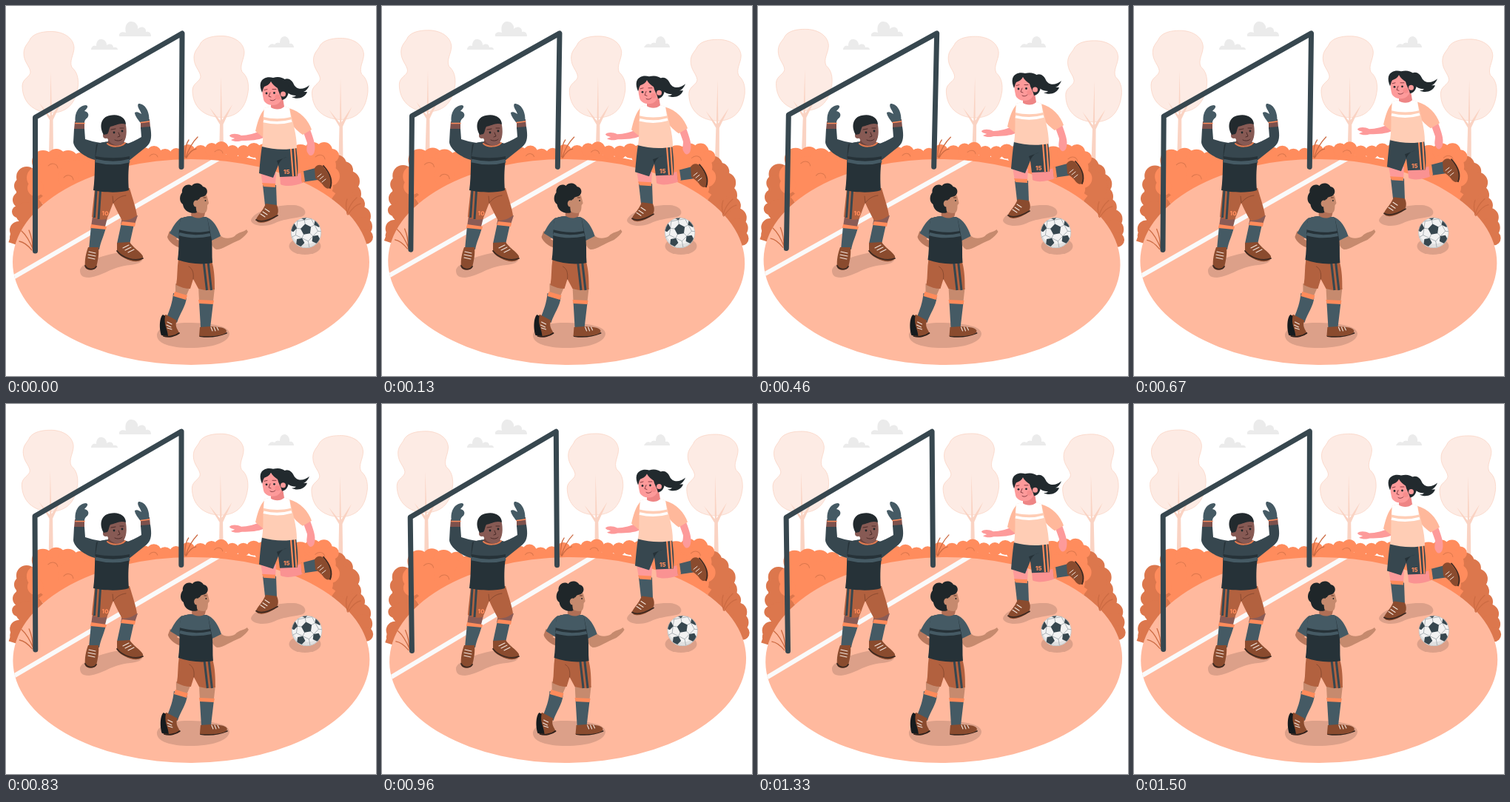
Recreate the animation shown at these times as an HTML page. Size 500x500 px, loop 1.54 s.

```html
<!DOCTYPE html>
<html lang="en">
<head>
<meta charset="utf-8">
<title>Football match</title>
<style>
html,body{margin:0;width:100%;height:100%;overflow:hidden;background:#fff}
svg{display:block;width:100vw;height:100vh}
text{font:800 8px Inter,sans-serif;fill:#ff8b5b}
.line{fill:none;stroke-linecap:round;stroke-linejoin:round}
.flat{fill:none}
</style>
</head>
<body>
<svg viewBox="0 0 500 500">
<defs>
  <g id="tree">
    <path d="M290 40.500C306 40 321 48 322 62C322 72 315 80 319 89C326 95 328 103 327.500 113C325 135 315 150 291 150.500C266 150 252 135 252 114C252 104 263 102 263 95C262 87 254 82 254 70C254 60 260 57 263 50C268 43 279 40.500 290 40.500Z" fill="#fdebe4" stroke="#fad0bf" stroke-width=".7"/>
    <path d="M290.500 95L292 154L306 133L293.500 160L294 206H288L289 160L275 137L289.500 155Z" fill="#fad3c3"/>
  </g>
  <clipPath id="field"><ellipse cx="250" cy="346" rx="241" ry="139"/></clipPath>
  <clipPath id="disc"><circle cx="405.500" cy="306.500" r="20.500"/></clipPath>
</defs>

<g fill="#ebebeb">
  <path d="M153 41C152 36 157 34 162 36C160 28 163 21 169 21C175 21 179 26 178 31C183 26 190 29 189 35C193 34 196 36 196 41Z"/>
  <path d="M115 59C115 55 118 53 122 54C122 47 126 44 130 45C134 46 136 49 136 53C141 50 145 52 145 56C149 55 151 57 151 59Z"/>
  <path d="M354 56C356 52 359 50 363 52C365 49 368 49 370 50C370 44 373 41 377 41C381 42 384 46 383 51C387 50 389 53 389 56Z"/>
</g>

<g id="scene">
  <use href="#tree" x="-230" y="-6"/>
  <use href="#tree"/>
  <use href="#tree" x="161.500" y="3"/>
  <g id="bush"></g>
  <ellipse cx="250" cy="346" rx="241" ry="139" fill="#ffb99e"/>
  <path d="M0 369L279 207H292L0 376Z" fill="#fafafa" clip-path="url(#field)"/>
  <g class="line" stroke="#cc6b43" stroke-width="1.300">
    <path d="M243 205C246 195 250 186 259 177M242 204C242 194 243 186 247 181M244 205C248 197 252 194 257 193"/>
    <path d="M37 330C33 320 28 310 21 304M36 328C36 318 34 310 31 303M35 330C30 324 25 319 18 318"/>
    <path d="M461 281C463 272 467 265 474 259M462 282C468 273 473 268 479 267M461 280C459 272 459 266 461 261"/>
  </g>
  <path class="line" d="M39.500 331V150.500L238 37L237 217.500" stroke="#37474f" stroke-width="7"/>
</g>

<g fill="#dca089">
  <path d="M100 357C101 345 150 329 174 332C189 336 190 348 168 350C142 352 132 365 112 367C102 367 100 363 100 357Z"/>
  <path d="M331 290C332 279 363 268 389 269C406 270 409 283 398 285C384 288 374 288 362 294C351 299 333 298 331 290Z"/>
  <ellipse cx="404" cy="324.500" rx="21.500" ry="11.500"/>
  <path d="M204 446C203 434 224 427 251 428C281 429 302 433 302 443C301 455 278 462 249 462C222 462 205 456 204 446Z"/>
</g>

<g id="keeper">
  <path d="M117 284L137 286L134 298H115ZM157 285L178 283L174 295L155 296Z" fill="#8a5b55"/>
  <path d="M115 297L135 299C133 309 128 318 126 329H112ZM156 293L173 295L167 322L150 321Z" fill="#455a64"/>
  <path d="M115 295L136 298L135 302L114 300ZM157 291L175 293L174 298L155 296Z" fill="#ff8b5b"/>
  <path d="M111 326L125 326C126 335 124 345 122 353C119 358 109 358 107 353C106 343 108 335 111 326ZM150 320L167 319C172 327 181 331 185 338C186 344 178 347 168 344C158 341 149 334 150 330Z" fill="#8a4b2e"/>
  <path class="line" d="M107 351C110 357 119 357 122 352M150 331C157 340 173 346 185 341" stroke="#3d2921" stroke-width="1.800"/>
  <path class="line" d="M112 332L121 334M111 336L121 338M111 340L120 342M158 327L166 323M161 330L169 326M165 333L173 329" stroke="#f3e4dc" stroke-width="1.100"/>
  <path d="M120 246L167 246C171 260 176 274 177 283C170 288 164 290 157 290C152 281 148 273 145 266C141 275 139 283 136 288C128 290 121 288 116 285C117 272 119 258 120 246Z" fill="#b2613f"/>
  <path d="M145 266C149 261 154 257 162 256M145 266L144 257" class="line" stroke="#8a4a30"/>
  <path class="flat" d="M122 249L119.500 286M127.500 250L125 288" stroke="#37474f" stroke-width="3"/>
  <text x="129.500" y="283" transform="rotate(3 134 280)">10</text>
  <path d="M93 156H106L106 167H92ZM182 154L194 153L195 164L182 166Z" fill="#7d514c"/>
  <path d="M92 166L106 166L107 180C114 182 120 184 128 185L120 208C108 205 92 194 91 184Z" fill="#37474f"/>
  <path d="M182 164L195 163C197 175 197 184 190 190L165 210L160 187C169 185 176 181 183 177Z" fill="#37474f"/>
  <path d="M122 187C130 182 158 182 167 187L167 209C165 221 165 236 166 249C154 253 131 252 118 249C121 228 119 207 122 187Z" fill="#263238"/>
  <path d="M124 186C137 182 157 182 167 187L167 203C154 206 136 206 121 203Z" fill="#37474f"/>
  <path class="flat" d="M121 209C137 213 153 213 167 209" stroke="#455a64" stroke-width="4.500"/>
  <path d="M139 179L159 181L160 188C154 191 143 190 137 186Z" fill="#70453f"/>
  <path d="M137 186C143 191 155 191 161 185" class="line" stroke="#e27b50" stroke-width="2"/>
  <path d="M137 159C145 153 160 153 162 161C164 173 162 184 155 188C147 190 140 185 137 179Z" fill="#875a54"/>
  <circle cx="135" cy="175" r="4" fill="#875a54"/>
  <path d="M132 174C125 162 129 150 140 148C151 145 162 150 162 160C154 157 148 162 141 163C139 166 139 171 137 173Z" fill="#222a2e"/>
  <g fill="#1d2427"><circle cx="146" cy="171" r="1.400"/><circle cx="157" cy="169" r="1.400"/></g>
  <path class="line" d="M142 167L148 166M154 165L159 165M152 171L154 176L151 177M147 181C151 183 155 182 157 180" stroke="#4b2c2a"/>
  <path d="M94 158C92 146 97 135 108 134C112 135 110 138 106 142C111 143 113 147 110 151C107 153 106 155 106 158ZM181 157C178 153 174 148 174 144C177 142 180 144 183 146C182 141 176 136 179 132C188 132 194 142 193.500 155L182 158Z" fill="#455a64"/>
  <path class="line" d="M94 158.500L106 158.500M182 157.500L193.500 156" stroke="#ff8b5b" stroke-width="1.600"/>
</g>

<g id="girl">
  <g transform="translate(0 2)">
    <path d="M370 227L394 225L402 222L403 236C392 241 378 243 371 239Z" fill="#fa9292"/>
    <path d="M399 222L418 217L421 233L400 236Z" fill="#455a64"/>
    <path d="M398 222L402 221L404 235L400 237Z" fill="#ff8b5b"/>
    <path d="M417 217C420 212 427 211 430 217C437 225 441 234 439 242C437 246 433 245 430 242C426 236 421 233 418 231Z" fill="#8a4b2e"/>
    <path class="line" d="M429 214C437 223 442 234 438 244" stroke="#3d2921" stroke-width="1.800"/>
    <path class="line" d="M421 229L426 225M424 232L429 228M427 236L432 232" stroke="#f3e4dc"/>
    <path d="M344 222L365 224L364 240H347Z" fill="#fd9a9a"/>
    <path d="M347 240H365L366 268L350 267Z" fill="#455a64"/>
    <path d="M346 237L364 238V243L348 242Z" fill="#ff8b5b"/>
    <path d="M351 265L366 267C370 276 367 283 360 286C351 292 338 293 338 286C341 280 347 275 351 265Z" fill="#8a4b2e"/>
    <path class="line" d="M338 287C344 291 355 288 367 281" stroke="#3d2921" stroke-width="1.800"/>
    <path class="line" d="M350 272L356 276M347 276L353 280M344 279L350 283" stroke="#f3e4dc" stroke-width="1.100"/>
    <path d="M346 187L392 188C394 204 395 216 394 228L370 229L368 213L361 230L342 224C343 212 344 200 346 187Z" fill="#37474f"/>
    <path d="M368 213C370 207 374 203 380 202L366 207Z" fill="#263238"/>
    <path class="flat" d="M385 190L388 228M390 190L392.500 228" stroke="#ff8b5b" stroke-width="2.200"/>
    <text x="375" y="225.500">15</text>
  </g>
  <path d="M349 167C337 172 326 175 318 175C312 172 305 172 302 175C302 177 307 178 309 179L304 181C309 184 315 183 319 182C331 182 341 181 348 178Z" fill="#fd9a9a"/>
  <path d="M402 171L411 167C415 178 419 188 417 196C416 203 410 204 408 199C405 195 407 191 407 185Z" fill="#fd9a9a"/>
  <path d="M350 139C343 145 340 157 337 169L348 178L354 160ZM382 138C398 142 409 155 413 167L401 174C392 168 387 161 382 154Z" fill="#ffb89b"/>
  <path d="M349 138C360 134 374 134 383 138C387 155 393 174 393 192C378 195 360 194 346 190C349 171 346 155 349 138Z" fill="#ffcdb5"/>
  <path d="M349 138C359 134 375 134 383 138L385 150C373 153 360 153 348 150Z" fill="#fff"/>
  <path class="flat" d="M348 155.500C360 158.500 374 158.500 386 155" stroke="#fff" stroke-width="3.600"/>
  <path d="M358 128L374 124L376 136C371 141 362 140 358 137Z" fill="#ee8585"/>
  <path d="M373 102C379 95 386 99 389 106C393 114 403 113 410 107C408 112 405 115 402 116L407 116C404 124 394 127 386 123C389 123 391 122 392 121C384 121 379 117 377 111Z" fill="#222a2e"/>
  <path d="M347 106C354 100 368 102 373 109C377 117 374 129 366 133C358 136 349 132 348 126C346 118 346 112 347 106Z" fill="#fd9a9a"/>
  <path d="M344 104C346 97 354 95 361 97C372 94 381 99 382 109C383 118 380 126 373 127C372 122 368 116 367 111C364 109 360 106 358 102C356 106 352 108 349 109C347 112 347 115 346 117C344 112 343 108 344 104Z" fill="#222a2e"/>
  <circle cx="374.500" cy="119" r="3.500" fill="#fd9a9a"/>
  <circle cx="367" cy="123" r="3.500" fill="#f48686" opacity=".65"/>
  <g fill="#222a2e"><circle cx="352" cy="118" r="1.400"/><circle cx="362.500" cy="117.500" r="1.400"/></g>
  <path class="line" d="M349 113.500L353 112.500M360 112.500L365 112.500M357 117L355 122L358 123M357 127C360 129 363 127 364 126" stroke="#8b3f45"/>
</g>

<g id="ball"></g>

<g id="boy">
  <path d="M229 375L249 379L243 393L229 388ZM260 379L282 381L280 399H261Z" fill="#c68a6e"/>
  <path d="M226 388L244 394C243 406 235 415 231 428L217 421C221 411 225 401 226 388ZM261 400L280 401L276 435L263 434Z" fill="#455a64"/>
  <path d="M228 386L245 391L243 397L226 392ZM260 397L281 398L280 403L261 402Z" fill="#ff8b5b"/>
  <path d="M216 417L231 425C227 433 233 438 234 442C230 447 218 448 211 445C207 435 209 420 216 417Z" fill="#8a4b2e"/>
  <path d="M212 417C207 421 207 437 210 445L219 446C218 435 213 431 215 419Z" fill="#161b1e"/>
  <path class="line" d="M213 446C220 448 229 446 234 442M262 446C274 448 288 446 298 442" stroke="#2f211c" stroke-width="1.800"/>
  <path d="M262 434L276 433C284 434 296 433 298 439C298 445 283 447 261 446Z" fill="#8a4b2e"/>
  <path class="line" d="M218 427L224 430M217 431L223 434M218 435L224 437M277 434L279 439M281 434L283 439M285 434L287 438" stroke="#f3e4dc" stroke-width="1.100"/>
  <path d="M233 342L278 344C282 358 282 371 282 383C274 385 267 384 260 382L253 369L249 382C242 382 236 380 230 377C232 365 231 354 233 342Z" fill="#b2613f"/>
  <path class="line" d="M253 369C254 360 252 355 247 352" stroke="#8a4a30"/>
  <path class="flat" d="M267 345L271.500 384M273 345L277.500 384" stroke="#37474f" stroke-width="3"/>
  <path d="M221 304L234 311L230 315L236 318V327C228 325 219 318 218 312Z" fill="#b9795e"/>
  <path d="M277 314L289 309C293 315 303 315 309 311C314 305 321 306 325 302L327 305C325 309 321 312 316 316C303 321 291 330 284 329C278 326 277 320 277 314Z" fill="#c68a6e"/>
  <path d="M237 286C229 291 225 300 221 307L234 315L240 299ZM269 285C280 287 287 301 290 311L278 317L266 303Z" fill="#455a64"/>
  <path d="M236 287C247 283 261 283 272 286L278 316C279 327 278 337 279 347C264 350 246 348 232 343C235 324 232 304 236 287Z" fill="#263238"/>
  <path d="M236 287C247 283 261 283 272 286L275 304C262 307 246 306 233 302Z" fill="#455a64"/>
  <path class="flat" d="M234 308C247 312 263 312 276 309" stroke="#455a64" stroke-width="4"/>
  <path d="M252 273L270 275L268 284C262 288 254 287 250 283Z" fill="#b06f56"/>
  <path d="M254 255C262 250 271 252 272 258L274 266C274 268 272 268 272 270C272 276 271 280 266 280C259 280 254 276 252 270Z" fill="#c68a6e"/>
  <path d="M258 279C250 282 240 277 239 268C233 264 235 255 238 252C237 244 245 239 251 243C256 237 264 240 266 244C273 245 274 254 268 257C266 258 263 257 261 261C256 262 256 273 258 279Z" fill="#1f2629"/>
  <ellipse cx="257" cy="267" rx="3.800" ry="4.500" fill="#c68a6e"/>
  <circle cx="269.500" cy="263" r=".9" fill="#222"/>
  <path class="line" d="M267 259L270 259" stroke="#5f3326"/>
</g>
</svg>

<script>
const $ = id => document.getElementById(id);
const LOOP = 1540, DARK = '#dc774d', BRIGHT = '#ff8c5d';

// Each bush: colour, arc along the field's rim, then x, y, radius triples
const bushes = [
  [DARK, 'M12 322A241 139 0 0 1 50 268.4',
    28,231,14, 22,243,11, 20,262,11, 34,252,20, 16,278,8, 28,280,15, 17,303,12, 14,312,9],
  [DARK, 'M440 260.5A241 139 0 0 1 487 316',
    447,214,13, 457,222,12, 464,237,14, 466,254,14, 473,268,12, 480,284,13, 482,298,13, 486,312,10, 450,240,22],
  [BRIGHT, 'M50 268.4A241 139 0 0 1 440 260.5',
    50,210,15, 68,206,13, 84,209,14, 101,209,11, 113,217,13, 43,232,15, 66,234,28, 95,232,24, 118,230,20, 40,246,11, 140,214,12,
    165,212,14, 186,203,12, 200,199,10, 215,203,10, 230,201,9, 246,197,10, 263,198,10, 278,194,9, 291,193,10, 306,197,9, 321,197,9, 335,195,10,
    350,200,14, 370,206,18, 398,203,16, 415,196,12, 430,195,11, 441,202,9, 425,216,21, 405,225,20, 438,230,13, 428,244,14]
];
$('bush').innerHTML = bushes.map(([fill, arc, ...n]) => {
  let s = `<path d="${arc}" fill="none" stroke="${fill}" stroke-width="18"/>`;
  for (let i = 0; i < n.length; i += 3) s += `<circle cx="${n[i]}" cy="${n[i + 1]}" r="${n[i + 2]}"/>`;
  return `<g fill="${fill}">${s}</g>`;
}).join('') + `<path class="line" d="M57 216C62 211 69 213 70 219M78 232C82 227 90 228 91 235M194 203C198 198 204 200 205 204M282 197C286 193 292 194 293 199M418 204C423 199 430 201 431 207" stroke="${DARK}"/>`;

function pentagon(x, y, r, turn) {
  const pts = [];
  for (let i = 0; i < 5; i++) {
    const a = turn + i * Math.PI * 0.4;
    pts.push((x + r * Math.cos(a)).toFixed(1) + ',' + (y + r * Math.sin(a)).toFixed(1));
  }
  return `<polygon points="${pts.join(' ')}"/>`;
}

function drawBall() {
  const cx = 405.5, cy = 302, tilt = -1.75;
  let dark = pentagon(cx, cy, 7.5, tilt), seams = '';
  for (let i = 0; i < 5; i++) {
    const a = tilt + i * Math.PI * 0.4, b = a + Math.PI * 0.2;
    const at = (r, q) => `${(cx + r * Math.cos(q)).toFixed(1)} ${(cy + r * Math.sin(q)).toFixed(1)}`;
    seams += `M${at(7, a)}L${at(13, a)}L${at(16, b)}L${at(13, a + Math.PI * 0.4)}M${at(16, b)}L${at(26, b)}`;
    dark += pentagon(cx + 18.5 * Math.cos(a), cy + 19 * Math.sin(a), 6, a + Math.PI);
  }
  $('ball').innerHTML = `<g clip-path="url(#disc)"><circle cx="405.5" cy="306.5" r="20.5" fill="#f2f2f2"/>
    <path d="M385 305C389 322 411 329 426 311V330H385Z" fill="#e0e0e0"/>
    <path class="line" d="${seams}" stroke="#9aa3a7" stroke-width=".8"/><g fill="#37474f">${dark}</g></g>
    <circle cx="405.5" cy="306.5" r="20.2" fill="none" stroke="#b4b9bb" stroke-width=".6"/>`;
}
drawBall();

// cubic-bezier(.25, .1, .25, 1)
function ease(x) {
  let lo = 0, hi = 1, s = x;
  for (let i = 0; i < 16; i++) {
    s = (lo + hi) / 2;
    const v = 0.75 * s * (1 - s) + s * s * s;
    if (v < x) lo = s; else hi = s;
  }
  return 0.3 * s * (1 - s) * (1 - s) + 3 * s * s * (1 - s) + s * s * s;
}

// Ten eased steps: 0, -1, 1, -1 ... -1, 0
function shake(p) {
  const i = Math.floor(p * 10), stop = k => k % 10 === 0 ? 0 : k % 2 ? -1 : 1;
  return stop(i) + (stop(i + 1) - stop(i)) * ease(p * 10 - i);
}

function render(ms) {
  const p = (ms % LOOP) / LOOP;
  $('scene').setAttribute('transform', `rotate(${Math.sin(p * Math.PI * 2)} 250 258)`);
  $('girl').setAttribute('transform', `translate(0 ${-10 * (1 - Math.abs(1 - 2 * p))})`);
  const s = shake(p);
  $('boy').setAttribute('transform', `translate(${2.5 * s} 0)`);
  $('ball').setAttribute('transform', `translate(${3 * s} 0)`);
}

const start = performance.now();
function tick() {
  render(performance.now() - start);
  requestAnimationFrame(tick);
}
render(0);
requestAnimationFrame(tick);
</script>
</body>
</html>
```
